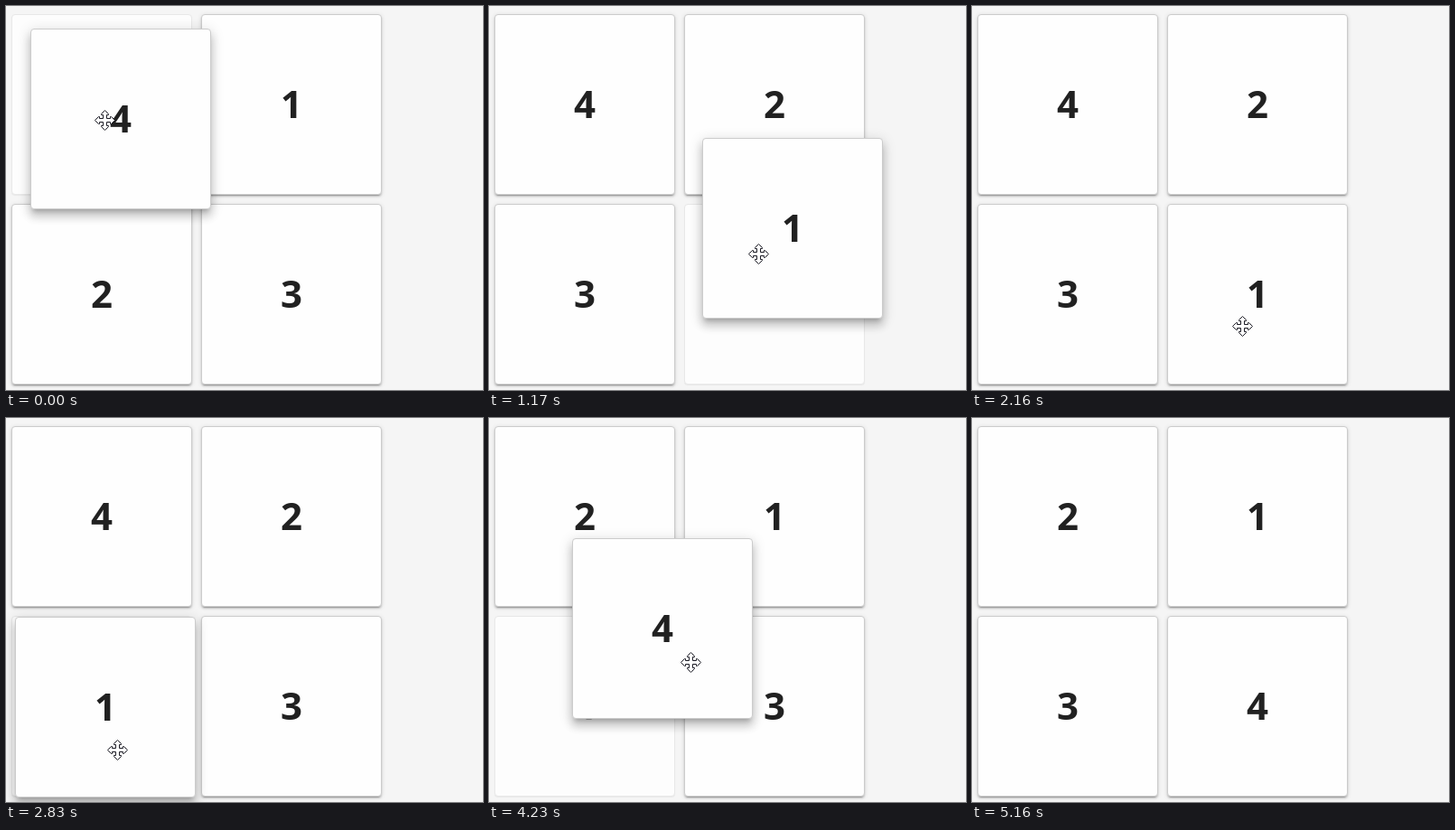
An HTML page for the animation above (5930 ms loop, 528 by 425 pixels).

```html
<!DOCTYPE html>
<html lang="en">
<head>
<meta charset="utf-8">
<title>Sortable grid</title>
<style>
  html, body { margin: 0; width: 100%; height: 100%; overflow: hidden; background: #f5f5f5; }
  #stage { position: relative; width: 528px; height: 425px; overflow: hidden; background: #f5f5f5; }
  .card {
    position: absolute; left: 0; top: 0; box-sizing: border-box;
    width: 200px; height: 200px; border: 1px solid #ccc; border-radius: 4px;
    background: #fefefe; color: #212121; text-align: center;
    font: bold 42px/196px "Open Sans", "Noto Sans", sans-serif;
    box-shadow: 0 3px 1px -2px rgba(0,0,0,.2), 0 2px 2px rgba(0,0,0,.14), 0 1px 5px rgba(0,0,0,.12);
  }
  .card.lifted {
    z-index: 2;
    box-shadow: 0 5px 5px -3px rgba(0,0,0,.2), 0 8px 10px 1px rgba(0,0,0,.14), 0 3px 14px 2px rgba(0,0,0,.12);
  }
  #ghost { background: #fdfdfd; border-color: #e8e8e8; color: #bbb; box-shadow: 0 1px 1px rgba(0,0,0,.05); }
  #cursor { position: absolute; left: 0; top: 0; z-index: 3; width: 1px; height: 1px; overflow: visible; }
</style>
</head>
<body>
<div id="stage">
  <div id="ghost" class="card"></div>
  <svg id="cursor">
    <path fill="#fff" stroke="#1b1b24" d="
      M0-11 L4-7 V-6 H2 V-2 H6 V-4 H7 L11 0 L7 4 H6 V2 H2 V6 H4 V7
      L0 11 L-4 7 V6 H-2 V2 H-6 V4 H-7 L-11 0 L-7-4 H-6 V-2 H-2 V-6 H-4 V-7 Z"/>
  </svg>
</div>
<script>
const LOOP = 5930, STEP = 145, SORT = 160, SETTLE = 250;

// Pointer waypoints: the pointer glides from one to the next
const path = [
  { t: 0, at: [109.5, 126.5] },
  { t: 150, at: [88.5, 110.5] },
  { t: 450, at: [270.5, 144.5] },
  { t: 594, at: [278.5, 137.5] },
  { t: 1170, at: [298.5, 274.5] },
  { t: 1580, at: [299.5, 354.5] },
  { t: 2290, at: [299.5, 354.5] },
  { t: 2690, at: [123.5, 367.5] },
  { t: 3350, at: [123.5, 367.5] },
  { t: 3500, at: [146.5, 236.5] },
  { t: 3780, at: [137.5, 146.5] },
  { t: 4230, at: [223.5, 270.5] },
  { t: 4700, at: [346.5, 360.5] },
  { t: 5160, at: [352.5, 450.5] },
  { t: LOOP, at: [352.5, 450.5] }
];

// Which card fills each slot, from a given time on
const orders = [
  { t: 0, cards: "4123" },
  { t: 940, cards: "4231" },
  { t: 2500, cards: "4213" },
  { t: 4040, cards: "2143" },
  { t: 4231, cards: "2134" }
];

// At time "grip" the pointer holds the card exactly over slot "from"
const drags = [
  { card: "4", from: 0, grab: 0, grip: 150, drop: 200 },
  { card: "1", from: 1, grab: 594, grip: 594, drop: 1720 },
  { card: "1", from: 3, grab: 2290, grip: 2290, drop: 2692 },
  { card: "4", from: 0, grab: 3780, grip: 3780, drop: 4720 }
];

const stage = document.getElementById("stage");
const ghost = document.getElementById("ghost");
const cursor = document.getElementById("cursor");
const cards = {};
for (const n of "1234") {
  const el = cards[n] = document.createElement("div");
  el.className = "card";
  el.textContent = n;
  stage.insertBefore(el, cursor);
}

const place = (el, [x, y]) => { el.style.transform = `translate(${x}px, ${y}px)`; };
const slot = i => [6 + 210 * (i % 2), 9 + 210 * (i >> 1)];
const easeOut = p => 1 - (1 - Math.min(1, Math.max(0, p))) ** 3;
const mix = (a, b, p) => a.map((v, i) => v + Math.round((b[i] - v) * p));
const indexAt = (list, t) => list.filter(item => item.t <= t).length - 1;

function leg(t) {
  const i = Math.min(indexAt(path, t), path.length - 2);
  return [path[i], path[i + 1]];
}

// The picture refreshes in even steps within each leg of the path
function stepped(t) {
  const [a, b] = leg(t);
  const span = b.t - a.t;
  const count = Math.round(span / STEP);
  return a.t + Math.floor((t - a.t) / span * count) * span / count;
}

function pointerAt(t) {
  const [a, b] = leg(t);
  return mix(a.at, b.at, (t - a.t) / (b.t - a.t));
}

function draggedAt({ from, grip, drop }, t) {
  const held = pointerAt(grip), now = pointerAt(Math.min(t, drop));
  return slot(from).map((v, i) => v + now[i] - held[i]);
}

function render(now) {
  const t = stepped(now % LOOP);
  const k = indexAt(orders, t);
  const { t: since, cards: order } = orders[k];
  const before = orders[Math.max(0, k - 1)].cards;
  const drag = drags.find(d => t >= d.grab && t < d.drop + SETTLE + 5);

  for (const n in cards) {
    const home = slot(order.indexOf(n));
    const lifted = Boolean(drag) && drag.card === n;
    cards[n].classList.toggle("lifted", lifted);
    place(cards[n], lifted
      ? mix(draggedAt(drag, t), home, easeOut((t - drag.drop) / SETTLE))
      : mix(slot(before.indexOf(n)), home, easeOut((t - since) / SORT)));
  }

  ghost.style.visibility = drag ? "visible" : "hidden";
  if (drag) {
    ghost.textContent = drag.card;
    place(ghost, slot(order.indexOf(drag.card)));
  }
  place(cursor, pointerAt(t));
}

const start = performance.now();
function tick() {
  render(performance.now() - start);
  requestAnimationFrame(tick);
}
tick();
</script>
</body>
</html>
```
